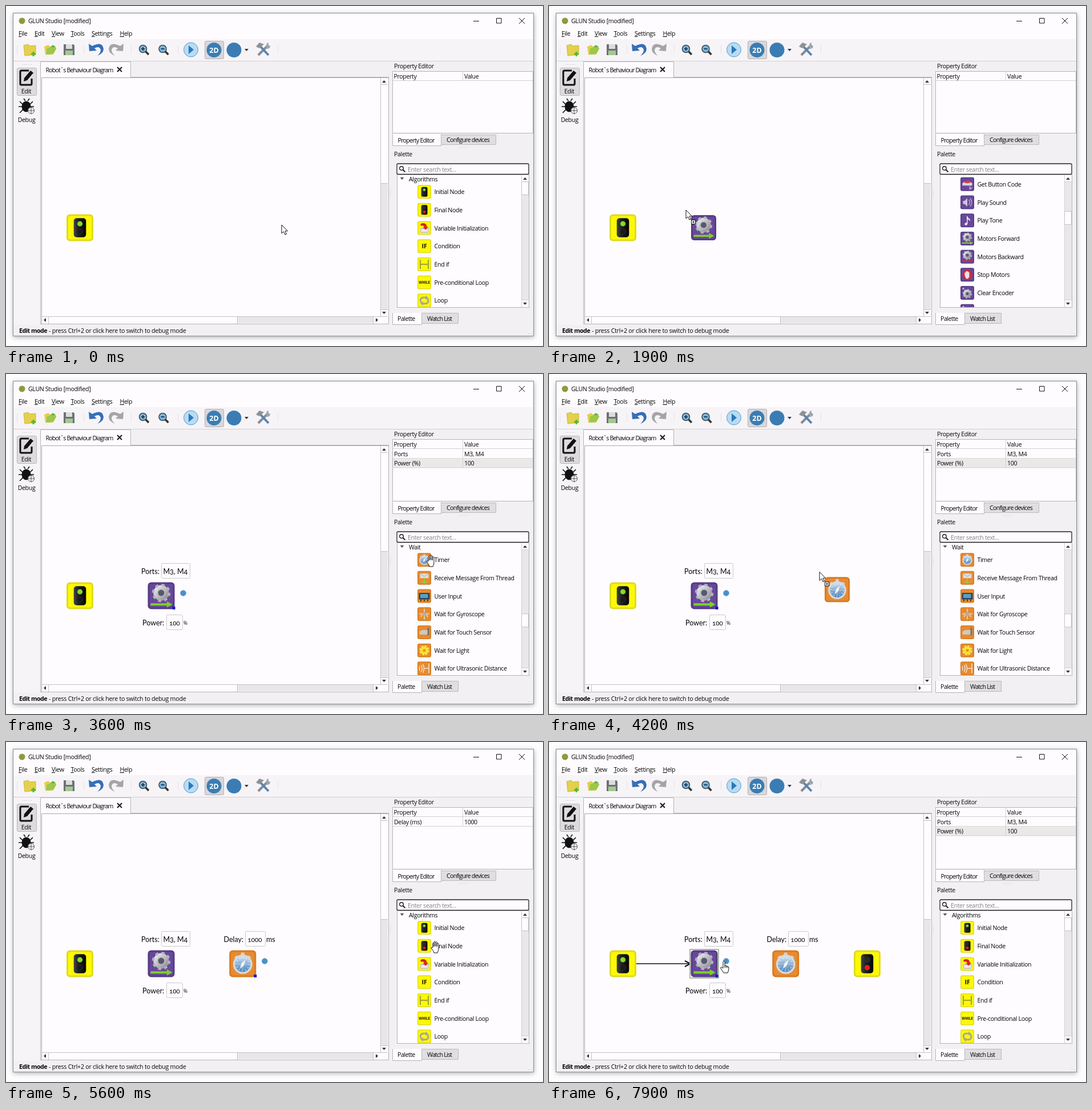
An HTML page for the animation above (8 s loop, 941 px wide and 595 px high).

```html
<!DOCTYPE html>
<html lang="en">
<head>
<meta charset="utf-8">
<title>Diagram editor</title>
<style>
html, body { margin: 0; width: 100%; height: 100%; overflow: hidden; background: #fdfcfe; }
svg { display: block; }
text { font: 10.6px "Open Sans", "Noto Sans", sans-serif; letter-spacing: -.35px; fill: #050505; white-space: pre; }
.tab { letter-spacing: -.72px; }
.mid { text-anchor: middle; }
.dim { fill: #8b8a8d; }
.u { text-decoration: underline; }
.label { font: 12.5px Lato, "Open Sans", sans-serif; font-variant-numeric: oldstyle-nums; letter-spacing: 0; }
.small { font-size: 11.6px; }
.box { fill: #fefdff; stroke: #a9a8aa; }
.panel { fill: #fefcff; stroke: #b5b4b7; }
.off { fill: #e0dee1; stroke: #bbb9bc; }
.rule { stroke: #d2d0d3; fill: none; }
.dash { fill: none; stroke: #a6a5a8; stroke-dasharray: 1.5 1; }
.grip { stroke: #c3c1c4; stroke-dasharray: 1 2; }
.word { font: 900 16px "Open Sans", sans-serif; fill: #3a3905; text-anchor: middle; letter-spacing: 0; }
</style>
</head>
<body>
<svg width="941" height="595" viewBox="0 0 941 595">
  <defs>
    <filter id="shade" x="-5%" y="-5%" width="110%" height="112%"><feDropShadow dx="0" dy="1.5" stdDeviation="4.500" flood-opacity=".33"/></filter>
    <clipPath id="listClip"><path d="M686 296.5H903V527H686Z"/></clipPath>
    <linearGradient id="metal" x2="1" y2="1"><stop stop-color="#e9eaec"/><stop offset="1" stop-color="#8f9098"/></linearGradient>
    <linearGradient id="dark" x2="1"><stop stop-color="#454545"/><stop offset=".4" stop-color="#1d1d1d"/><stop offset="1" stop-color="#050505"/></linearGradient>
    <linearGradient id="face" x2="0" y2="1"><stop stop-color="#dce8f2"/><stop offset=".45" stop-color="#8fb3d6"/><stop offset="1" stop-color="#4a7fb8"/></linearGradient>
  </defs>

  <!-- window -->
  <rect x="13" y="13" width="912" height="565" fill="#f2f0f3" filter="url(#shade)"/>
  <path d="M13 13H925V58H13Z" fill="#fefcff"/>
  <path d="M13 58H925V96H13ZM13 96H60V558H13Z" fill="#f6f4f7"/>
  <rect x="12.5" y="12.5" width="912" height="565" fill="none" stroke="#8a898c"/>
  <circle cx="28" cy="26" r="5.5" fill="#8c9c3c"/>
  <text x="39" y="30">GLUN Studio [modified]</text>
  <path d="M819 26.5H829M859.5 21.5H868V30H859.5ZM899 21L909 31M909 21L899 31" fill="none" stroke="#111"/>
  <g id="menu"></g>

  <!-- toolbar -->
  <path class="rule" d="M13 96.5H924"/>
  <g id="grips"></g>
  <path d="M31 69l8-2 2 3 11-1v16l-19 2Z" fill="#e4d04d" stroke="#cdb637"/>
  <path d="M48 80v8M44 84h8" stroke="#55b82b" stroke-width="3"/>
  <path d="M67 71l7-3 3 3 9-2v6l-4 10H69Z" fill="#e2cf4f"/>
  <path d="M72 74l14-4 2 5-5 9-13 1Z" fill="#9dc84a"/><path d="M78 72l4-4 4 4" fill="#58b336"/>
  <path d="M101 67h17l2 2v17h-19Z" fill="#6d7175"/><path d="M105 67h11v8h-11Z" fill="#d9dde0"/><path d="M104 78h13v8h-13Z" fill="#a5c891"/>
  <path d="M145 66l1 13 13-1-4-4q9-5 11 3 0 5-6 10 11-4 11-12-2-14-20-5Z" fill="#356fb5"/>
  <path d="M206 66l-1 13-13-1 4-4q-9-5-11 3 0 5 6 10-11-4-11-12 2-14 20-5Z" fill="#a4a5a8"/>
  <g id="lens"></g>
  <circle cx="324" cy="76.500" r="12.500" fill="#b7dcf4" stroke="#5799ca"/><path d="M320 69l9 7.500-9 7.500Z" fill="#2b78b8"/>
  <rect x="348.500" y="61.500" width="33" height="31" rx="2" fill="#d9d7da" stroke="#b3b1b4"/>
  <circle cx="364.500" cy="77" r="13" fill="#3b7db3"/>
  <text class="mid" x="364.500" y="81.500" style="font-size:12.500px;font-weight:700;fill:#fff;letter-spacing:0">2D</text>
  <circle cx="399.500" cy="77" r="13" fill="#3b7db3"/>
  <path d="M418 75h7l-3.500 4Z" fill="#333"/>
  <path d="M442 86L459 69" stroke="#858b91" stroke-width="4"/><path d="M445 70L460 86" stroke="#5684b5" stroke-width="4"/>
  <path d="M438 71l6-7 8 3-8 7Z" fill="#8b9298"/><path d="M456 72q-1-7 4-8v4l3 2q0 5-6 5" fill="#a0a6ab"/>

  <!-- mode bar -->
  <rect x="19.500" y="108.500" width="34" height="48" rx="2" fill="#dddbde" stroke="#b9b7ba"/>
  <path d="M40 113H27q-2 0-2 2v21q0 2 2 2h16q2 0 2-2v-9" fill="none" stroke="#111" stroke-width="3"/>
  <path d="M31 132l1-6 11-13 5 4-11 13Z" fill="#111"/>
  <text class="mid" x="35.500" y="152.500">Edit</text>
  <path d="M24 167l5 5M47 167l-5 5M22 176h27M24 187l6-6M31 162l3 4M41 162l-3 4" stroke="#111" stroke-width="1.600"/>
  <ellipse cx="35.500" cy="176" rx="8" ry="9.500" fill="#111"/>
  <circle cx="44" cy="183" r="5.500" fill="#f6f4f7" stroke="#555"/><path d="M38 183H50M44 177V189" stroke="#555"/>
  <text class="mid" x="36" y="202.500">Debug</text>

  <!-- diagram view -->
  <rect class="panel" x="60.500" y="124.500" width="610" height="432"/>
  <path d="M60.500 125V97.500H218.500V125" class="panel"/><path d="M61 124.500H218" stroke="#fefcff" stroke-width="2"/>
  <path d="M62.500 556V125.500H670" fill="none" stroke="#aaa8ab"/>
  <text class="tab" x="69.500" y="115.500" style="letter-spacing:-.82px">Robot`s Behaviour Diagram</text>
  <path d="M195 107l8 8M203 107l-8 8" stroke="#111" stroke-width="1.900"/>
  <path d="M657 310h12v221h-12ZM405 544h238v11H405Z" fill="#e8e6e9"/>
  <path d="M656.500 126V543.500M657 137.500h12M657 310.500h12M657 531.500h12M63 543.500H669M74.500 544v12M405.500 544v12M643.500 544v12" stroke="#c4c2c5"/>
  <path d="M659 134h7l-3.500-4ZM659 535h7l-3.500 4ZM70 546v7l-4-3.500ZM648 546v7l4-3.500Z" fill="#333"/>

  <!-- properties -->
  <text x="680" y="109">Property Editor</text>
  <rect class="panel" x="677.500" y="114.500" width="246" height="108"/>
  <path class="rule" d="M678 130.500H923M800.500 115V130"/>
  <text x="679.500" y="127">Property</text><text x="803" y="127">Value</text>
  <g id="props"></g>
  <path class="panel" d="M677.500 224V244.500H762.500V224"/><path class="off" d="M762.500 225.500H858.500V242.500H762.500Z"/>
  <text class="tab" x="686.500" y="238.500">Property Editor</text><text class="tab" x="772" y="237.500">Configure devices</text>

  <!-- palette -->
  <text x="680" y="263">Palette</text>
  <rect x="685" y="276" width="231" height="18.500" rx="2" fill="#fefcff" stroke="#222" stroke-width="1.300"/>
  <circle cx="693" cy="284" r="3.300" fill="none" stroke="#222" stroke-width="1.400"/><path d="M695.500 286.500l4 4" stroke="#222" stroke-width="2"/>
  <text x="704" y="289.500" style="fill:#858388">Enter search text...</text>
  <rect class="panel" x="685.500" y="295.500" width="231" height="232"/>
  <g clip-path="url(#listClip)"><g id="list"></g></g>
  <path d="M904 296h12v231h-12Z" fill="#e9e7ea"/><path d="M904 296h12v11h-12ZM904 515h12v12h-12Z" fill="#fefcff"/>
  <path class="rule" d="M903.500 296V527M904 307.500h12M904 514.500h12"/>
  <rect id="thumb" x="903.500" width="12" height="23" fill="#fefcff" stroke="#c4c2c5"/>
  <path d="M906 304h7l-3.500-4ZM906 519h7l-3.500 4Z" fill="#333"/>
  <path class="panel" d="M677.500 537V557.500H728.500V537"/><path class="off" d="M728.500 537.500H792.500V555.500H728.500Z"/>
  <text class="tab" x="686" y="551" style="letter-spacing:-.5px">Palette</text><text class="tab" x="738" y="550.500">Watch List</text>

  <text x="23" y="572" style="font-weight:700;letter-spacing:-.45px">Edit mode</text>
  <text x="75" y="572" style="letter-spacing:-.24px">- press Ctrl+2 or click here to switch to debug mode</text>

  <g id="link" fill="none" stroke="#111" stroke-width="1.500"><path id="wire"/><path id="head" stroke-width="2"/></g>
  <g id="nodes"></g>
  <g id="drag"></g>
  <g id="cursor" fill="#fff" stroke="#111"></g>
</svg>
<script>
const $ = id => document.getElementById(id);
const LOOP = 8000, STEP = 100, ITEM = 31.7, HEADER = 13.3;

/* ---------- icons, drawn in a 48 x 48 box ---------- */
const tones = {
  y: ['#e2da20', '#fbf906'], p: ['#573a86', '#68489a'],
  o: ['#d97a22', '#e88b30'], g: ['#959496', '#a3a2a4']
};
const stroke = (d, color, w = 3) => `<path d="${d}" fill="none" stroke="${color}" stroke-width="${w}"/>`;
const fill = (d, color) => `<path d="${d}" fill="${color}"/>`;
const disc = (x, y, r, color, extra = '') => `<circle cx="${x}" cy="${y}" r="${r}" fill="${color}" ${extra}/>`;
const lamp = (top, low) => `<rect x="13" y="7" width="22" height="34" rx="5" fill="url(#dark)"/>` +
  disc(24, 17, 5, top, 'stroke="#303030"') + disc(24, 31, 5, low, 'stroke="#303030"');
const gear = (y = 19) => disc(24, y, 10.5, 'none', 'stroke="url(#metal)" stroke-width="7"') +
  disc(24, y, 14.5, 'none', 'stroke="#b4b5bc" stroke-width="4" stroke-dasharray="5.500 5.900"') +
  disc(24, y, 6.5, '#5b5570', 'stroke="#b9bbc1" stroke-width="2"');
const arrow = color => fill('M5 37.500H34V34L44 39.500 34 45V41.500H5Z', color);
const note = fill('M22 9h3q1 7 8 10 2 5-1 9 0-6-7-8V36q-2 6-8 5-5-4 0-8 3-2 5-1Z', '#e6e2ee');
const letter = fill('M9 9H39V25H9Z', '#dedfe3') + stroke('M10 10L24 19 38 10', '#999', 1.5) + stroke('M24 25V40M14 36L24 42 34 36', '#8fce43', 4);
const glyphs = {
  go: lamp('#82dc28', '#1a1a1a'),
  end: lamp('#292929', '#ee1820'),
  init: fill('M8 28L17 22H41L38 41H11Z', '#c9c9cf') + fill('M12 29H37L35 37H14Z', '#eeeef1') + fill('M11 9Q31 2 33 20H38L29 30 18 22H24Q22 13 11 16Z', '#d92227'),
  if: '<text class="word" x="24" y="31" style="font-size:20px">IF</text>',
  while: '<text class="word" x="24" y="28" style="font-size:12px">WHILE</text>',
  fork: stroke('M10 8V40M10 24H38M38 8V40', '#a0a234', 4),
  loop: stroke('M15 33Q5 20 17 14H32M33 15Q44 28 31 35H17', '#a9a894', 6) + fill('M28 7L38 14 28 21ZM20 28L10 35 20 42Z', '#a9a894'),
  letter, note,
  camera: fill('M6 16H34V20H42V32H34V35H6Z', '#6b6a6d'),
  mail: fill('M7 14H41V34H7Z', '#dddcdf') + stroke('M8 15L24 26 40 15', '#c0bfc2', 1.5),
  button: fill('M7 21Q24 6 41 21V29H7Z', '#d8d4de') + fill('M11 17Q24 6 37 17 24 25 11 17Z', '#df3d3f') + stroke('M33 31V41L41 36', '#c7bfd4'),
  sound: fill('M9 19H15L24 9V39L15 30H9Z', '#cfc7dc') + stroke('M29 15Q36 24 29 33M34 10Q45 24 34 38', '#b9aecb', 3),
  fwd: gear() + arrow('#7ed029'),
  back: gear() + arrow('#d82630'),
  halt: disc(24, 24, 17, '#cf2a38') + fill('M15 27V16h4v6V12h4v9V12h4v10V15h4v17l-5 6H20Z', '#ece2e4'),
  gear: gear(27) + disc(10, 9, 3, '#cfc9da'),
  timer: fill('M21 4H27V10H21ZM35 9L39 13 36 16 32 12ZM13 9L9 13 12 16 16 12Z', '#cfd4da') +
    disc(24, 25, 15.5, 'url(#face)', 'stroke="#d5dae0" stroke-width="3.500"') +
    disc(24, 25, 11.5, 'none', 'stroke="#f1f6fa" stroke-width="2" stroke-dasharray="1.200 4.820"') +
    stroke('M24 15V35M14 25H34', '#b9cfe4', 1) + fill('M29 17L26 27 19 33 22 23Z', '#f3f7fa'),
  file: fill('M6 15H23V34H6ZM28 13H42V35H28Z', '#dbd8e2') + fill('M18 21H25V17L33 24 25 31V27H18Z', '#76618f'),
  cross: fill('M11 9H37V40H11Z', '#d5d3d9') + stroke('M8 8L40 40M40 8L8 40', '#d41f2b', 4),
  screen: fill('M5 13H43V36H5Z', '#26465d') + fill('M10 17H37V31H10Z', '#58a0c5') + stroke('M12 36V43M24 36V43M36 36V43', '#222'),
  gyro: stroke('M24 5V43M6 23H42M12 34Q24 8 36 34', '#dccbb9', 4) + disc(24, 23, 7, '#c2a98d'),
  touch: fill('M6 22L18 16H36V32H8Z', '#cdc8c3') + fill('M35 8H41V35H35Z', '#78736f'),
  sun: disc(24, 24, 13, '#ffe022', 'stroke="#f7e449" stroke-width="9" stroke-dasharray="7 3"') + disc(24, 24, 5, '#e8902f'),
  wave: stroke('M7 16V32M13 12Q19 24 13 36M19 9Q27 24 19 39M23 24H40M40 7V41', '#f1e3d2', 3),
  plain: disc(24, 24, 13, '#c8c4ce')
};
function tile(tone, glyph, x, y, size) {
  const [edge, face] = tones[tone];
  return `<g transform="translate(${x} ${y}) scale(${size / 48})"><rect width="48" height="48" rx="6" fill="${edge}"/>` +
    `<rect x="3" y="3" width="42" height="42" rx="4" fill="${face}"/>${glyphs[glyph]}</g>`;
}

/* ---------- palette rows: header, or name:glyph items in one tone ---------- */
const rows = [];
function section(title, tone, items) {
  rows.push({ title });
  for (const item of items.split('|')) {
    const [name, glyph = 'plain'] = item.split(':');
    rows.push({ name, glyph, tone: name.match(/Video|Send message/) ? 'g' : tone });
  }
}
section('Algorithms', 'y', 'Initial Node:go|Final Node:end|Variable Initialization:init|Condition:if|End if:fork|Pre-conditional Loop:while|Loop:loop|' +
  'Switch:fork|Subprogram|Fork:fork|Join:fork|Kill Thread|Function|Random Value|Comment:comment');
section('Actions', 'p', 'Send Message To Thread:letter|Get Button Code:button|Play Sound:sound|Play Tone:note|Motors Forward:fwd|Motors Backward:back|' +
  'Stop Motors:halt|Clear Encoder:gear|Servo:gear|Say:sound|Led|Smile|Sad Smile|Print Text|Clear Screen|System Command|' +
  'Enable Video Streaming:camera|Disable Video Streaming:camera|Send message:mail|Write To File:file|Remove File:cross|Calibrate gyroscope:gear');
section('Wait', 'o', 'Timer:timer|Receive Message From Thread:letter|User Input:screen|Wait for Gyroscope:gyro|Wait for Touch Sensor:touch|' +
  'Wait for Light:sun|Wait for Ultrasonic Distance:wave|Wait for Infrared Distance:wave|Wait for Encoder:gear|Wait for Button:button');

let end = 296;
$('list').innerHTML = rows.map(row => {
  row.top = end;
  end += row.title ? HEADER : ITEM;
  if (row.title) return `<path d="M690.500 ${row.top + 4}h7l-3.500 4Z" fill="#555"/><text x="706" y="${row.top + 10.500}">${row.title}</text>`;
  const mid = row.top + ITEM / 2;
  const icon = row.glyph === 'comment'
    ? `<path d="M721.500 ${mid - 6.500}h20l4 4v9h-24Z" class="box" style="stroke:#555"/>`
    : tile(row.tone, row.glyph, 721, mid - 12, 24);
  return `${icon}<text x="750.500" y="${mid + 4}"${row.tone === 'g' ? ' class="dim"' : ''}>${row.name}</text>`;
}).join('');

/* ---------- fixed repeats ---------- */
$('menu').innerHTML = [['File', 22], ['Edit', 50], ['View', 80], ['Tools', 113.5], ['Settings', 150], ['Help', 199.5]]
  .map(([s, x]) => `<text x="${x}" y="52"><tspan class="u">${s[0]}</tspan>${s.slice(1)}</text>`).join('');
$('grips').innerHTML = [19, 136, 219, 301, 476].map(x => `<path class="grip" d="M${x}.500 70V84"/>`).join('') +
  '<path class="grip" d="M29 102.500H45M794 247.500H810M673.500 322V336M915 573.500H923"/>';
$('lens').innerHTML = [[240, 'M237 75h6M240 72v6'], [274.5, 'M271.500 75h6']].map(([x, sign]) =>
  stroke(`M${x + 4} 79l6 6`, '#333', 3.5) + disc(x, 75, 6.5, '#79b4dd', 'stroke="#41474d" stroke-width="1.500"') + stroke(sign, '#153e62', 2)).join('');

/* ---------- diagram nodes ---------- */
const TOP = 364.5, SIZE = 47;
const label = (x, y, s, cls = '') => `<text class="label ${cls}" x="${x}" y="${y}">${s}</text>`;
const frame = (x, y, w) => `<rect class="dash" x="${x}.500" y="${y}.500" width="${w}" height="26" rx="2"/>`;
const nodes = [
  { x: 106, from: 0, tone: 'y', glyph: 'go', props: [] },
  { x: 248.5, from: 2100, tone: 'p', glyph: 'fwd', props: [['Ports', 'M3, M4'], ['Power (%)', '100']],
    text: label(237, 350, 'Ports:') + frame(272, 331, 50) + label(275.5, 350, 'M3, M4') +
      label(239, 440, 'Power:') + frame(281, 421, 28) + label(286, 440, '100', 'small') + `<text x="311" y="439" style="font-size:8.500px">%</text>` },
  { x: 391.3, from: 4500, tone: 'o', glyph: 'timer', props: [['Delay (ms)', '1000']],
    text: label(381.5, 350, 'Delay:') + frame(419, 331, 35) + label(423.5, 350, '1000', 'small') + label(456, 350, 'ms') },
  { x: 534, from: 6300, tone: 'y', glyph: 'end', props: [] }
];
$('nodes').innerHTML = nodes.map(({ x, tone, glyph, text = '' }) => `<g>${text}
  <g class="glow"><rect x="${x - 1.5}" y="${TOP - 1.5}" width="50" height="50" fill="#fff" stroke="#a9bba5" stroke-width="2"/></g>
  ${tile(tone, glyph, x, TOP, SIZE)}
  <g class="mark"><circle cx="${x + 62}" cy="383.500" r="5" fill="#4b8fcb" stroke="#86b6de"/>
  <rect x="${x + 43}" y="407" width="5" height="5" fill="#1016dc"/></g></g>`).join('');

/* ---------- timeline ---------- */
const path = [
  [0, 483, 383], [300, 780, 383], [700, 780, 385], [900, 780, 396], [1100, 765, 402], [1200, 760, 402],
  [1800, 250, 357], [1900, 240, 357], [2100, 240, 357], [2700, 742, 370], [3300, 745, 330], [3600, 737, 316],
  [3800, 737, 316], [4400, 382, 357], [4500, 382, 357], [4800, 750, 370], [5300, 750, 370], [5600, 745, 348],
  [5700, 745, 348], [6200, 525, 357], [6500, 524, 359], [6900, 130, 378], [7100, 150, 380], [7300, 162, 381],
  [7700, 250, 384], [7900, 300, 383], [8000, 300, 383]
];
const tops = [[0, 0], [400, 3], [500, 9], [600, 12], [700, 15], [900, 18], [2800, 21], [2900, 24], [3000, 27], [3100, 30],
  [3200, 33], [3300, 36], [3400, 39], [4800, 36], [4900, 33], [5000, 27], [5100, 18], [5200, 9], [5300, 3], [5400, 0]];
const shapes = [[0, 'arrow'], [300, 'open'], [1200, 'arrow'], [2700, 'open'], [3800, 'arrow'], [4800, 'open'],
  [5700, 'arrow'], [6300, 'point'], [6600, 'arrow'], [6900, 'point']];
const picks = [[0, -1], [2100, 1], [4500, 2], [6300, 3], [6900, 0], [7700, 1]];
const hovers = [[0, -1], [6300, 3], [6600, -1], [6900, 0], [7100, -1], [7700, 1]];
const drags = [[0, -1], [1200, 1], [2100, -1], [3800, 2], [4500, -1], [5700, 3], [6300, -1]];

const cursors = {
  arrow: '<path d="M0 0V15L3.500 11.800 6 17.200 8.400 16.200 6 10.800H10.500Z"/>',
  point: '<path d="M5 1.500C5 0 8 0 8 1.500V8l5 1.500q2 .5 2 3 0 5-2 8.500H6Q3 16 .8 13q-.5-2 1.500-2L5 13Z"/><path d="M8 8v4M10.500 8.700v3.500M13 9.500v3" fill="none"/>',
  open: '<path d="M3 12L2.500 4.500q1-1.800 2.300 0V10 2q1.200-1.800 2.600 0V9.500 2.300q1.300-1.600 2.600 0V10 4.500q1.700-1.500 3 .3V13q0 4-2 8H5Q4 17 1 14-.7 11 1.500 11Z"/>'
};

const at = (steps, t) => steps.filter(s => s[0] <= t).pop()[1];
function place(t) {
  const i = Math.max(1, path.findIndex(k => k[0] > t));
  const [t0, x0, y0] = path[i - 1], [t1, x1, y1] = path[i];
  const k = (t - t0) / (t1 - t0), e = k * k * (3 - 2 * k);
  return [x0 + (x1 - x0) * e, y0 + (y1 - y0) * e];
}
const show = (el, on) => el.setAttribute('visibility', on ? 'visible' : 'hidden');
const propRow = ([name, value], i) => {
  const y = 131 + i * 16.5;
  return (i % 2 ? `<path d="M678 ${y}H923V${y + 16.5}H678Z" fill="#ebe8e8"/>` : '') +
    `<path class="rule" d="M678 ${y + 16.5}H923M800.500 ${y}v16.500"/><text x="680" y="${y + 12.5}">${name}</text><text x="803" y="${y + 12.5}">${value}</text>`;
};

function draw(t) {
  const [x, y] = place(t), top = at(tops, t), pick = at(picks, t), hover = at(hovers, t), drag = at(drags, t);
  $('list').setAttribute('transform', `translate(0 ${296 - rows[top].top})`);
  $('thumb').setAttribute('y', 307.5 + top * 2.88);
  $('props').innerHTML = pick < 0 ? '' : nodes[pick].props.map(propRow).join('');

  [...$('nodes').children].forEach((el, i) => {
    el.style.display = t >= nodes[i].from ? '' : 'none';
    show(el.querySelector('.glow'), i === hover);
    show(el.querySelector('.mark'), i === pick);
  });

  const tip = t >= 7700 ? [248, 388] : [x, y];
  show($('link'), t >= 7300);
  $('wire').setAttribute('d', `M153 388L${tip}`);
  $('head').setAttribute('d', `M${tip[0] - 10} ${tip[1] - 5}L${tip}l-10 5`);

  $('drag').innerHTML = drag < 0 ? '' : tile(nodes[drag].tone, nodes[drag].glyph, x + 9, y + 9, 44) +
    (x < 656 ? `<rect x="${x + 9.5}" y="${y + 17.5}" width="7" height="7" fill="#fff" stroke="#111"/>` + stroke(`M${x + 11} ${y + 21}h4m-2-2v4`, '#111', 1) : '');
  $('cursor').setAttribute('transform', `translate(${x} ${y})`);
  $('cursor').innerHTML = cursors[at(shapes, t)];
}

const start = performance.now();
let last = -1;
function tick() {
  const t = Math.floor((performance.now() - start) % LOOP / STEP) * STEP;
  if (t !== last) draw(last = t);
  requestAnimationFrame(tick);
}
tick();
</script>
</body>
</html>
```
